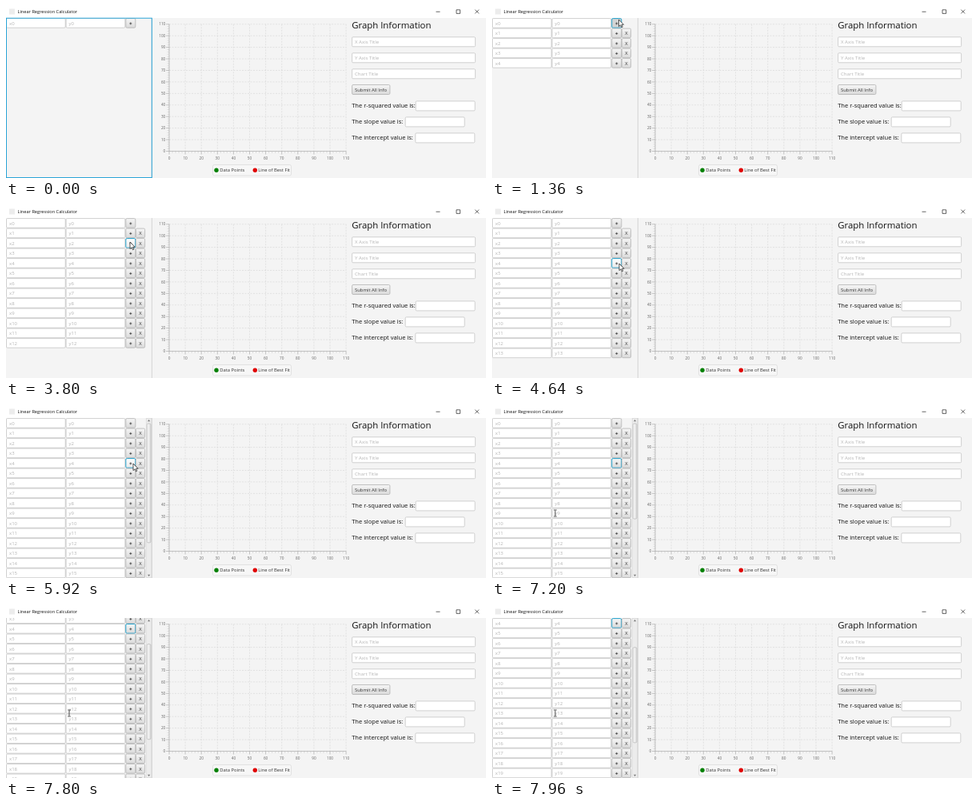
These frames come from a looping animation (600 by 215 pixels, 8000 ms). An HTML page:

```html
<!DOCTYPE html>
<html lang="en">
<head>
<meta charset="utf-8">
<title>Linear Regression Calculator</title>
<style>
html, body { margin: 0; width: 100%; height: 100%; overflow: hidden; background: #f4f4f4; }
svg { display: block; width: 600px; height: 215px; }
text { font-family: "Open Sans", "Noto Sans", sans-serif; fill: #333; white-space: pre; }
.prompt { fill: #b4b4b4; }
.axis { fill: #666; }
</style>
</head>
<body>
<svg id="stage" viewBox="0 0 600 215" xmlns="http://www.w3.org/2000/svg">
  <defs>
    <linearGradient id="btn" x2="0" y2="1"><stop offset="0" stop-color="#f6f6f6"/><stop offset="1" stop-color="#dadada"/></linearGradient>
    <linearGradient id="hover" x2="0" y2="1"><stop offset="0" stop-color="#fff"/><stop offset="1" stop-color="#eaeaea"/></linearGradient>
    <linearGradient id="bar"><stop offset="0" stop-color="#fafafa"/><stop offset="1" stop-color="#dedede"/></linearGradient>
    <clipPath id="view"><rect y="15" width="182" height="200"/></clipPath>
  </defs>
</svg>
<script>
const LOOP = 8000, STEP = 40, TOP = 15, PITCH = 12.5, VIEW = 200;
const TRACK_Y = 22, TRACK_H = 186;
const stage = document.getElementById('stage');

function el(tag, attrs, parent = stage) {
  const node = document.createElementNS('http://www.w3.org/2000/svg', tag);
  for (const k in attrs) node.setAttribute(k, attrs[k]);
  parent.appendChild(node);
  return node;
}
const set = (node, attrs) => { for (const k in attrs) node.setAttribute(k, attrs[k]); };
const show = (node, on) => node.setAttribute('visibility', on ? 'visible' : 'hidden');
const rect = (x, y, width, height, attrs, parent) => el('rect', { x, y, width, height, ...attrs }, parent);
const path = (d, attrs, parent) => el('path', { d, fill: 'none', ...attrs }, parent);
function label(str, x, y, size, attrs, parent) {
  const node = el('text', { x, y, 'font-size': size, ...attrs }, parent);
  node.textContent = str;
  return node;
}
const field = (x, y, w, h, parent) =>
  rect(x, y, w, h, { rx: 1.2, fill: '#fff', stroke: '#c6c6c6', 'stroke-width': 0.8 }, parent);
const button = (x, y, w, h, parent) =>
  rect(x, y, w, h, { rx: 1.4, fill: 'url(#btn)', stroke: '#b3b3b3', 'stroke-width': 0.8 }, parent);

function drawTitleBar() {
  rect(0, 0, 600, 15, { fill: '#fff' });
  rect(4, 3.5, 7, 7, { fill: '#ececec' });
  label('Linear Regression Calculator', 14.5, 9.3, 5.65, { style: 'fill:#111' });
  const line = { stroke: '#222', 'stroke-width': 0.7 };
  path('M537.5 7.2h5', line);
  path('M563 4.8h4.6v4.6h-4.6z', line);
  path('M586.3 4.6l4.8 4.8m0-4.8l-4.8 4.8', line);
}

function drawChart() {
  const x0 = 204, y0 = 181.5, dx = 20.1, dy = 14.43;
  const right = x0 + 11 * dx, top = y0 - 11 * dy;
  let grid = '', major = '', minor = '';
  for (let i = 0; i <= 11; i++) {
    const x = x0 + i * dx, y = y0 - i * dy;
    grid += `M${x} ${top}V${y0}M${x0} ${y}H${right}`;
    major += `M${x} ${y0}v4M${x0} ${y}h-4`;
    label(i * 10, x, 191.6, 4.7, { class: 'axis', 'text-anchor': 'middle' });
    label(i * 10, 199.3, y + 1.7, 4.7, { class: 'axis', 'text-anchor': 'end' });
    if (i < 11) for (let j = 1; j < 5; j++)
      minor += `M${x + j * dx / 5} ${y0}v2.5M${x0} ${y - j * dy / 5}h-2.5`;
  }
  path(grid, { stroke: '#d6d6d6', 'stroke-width': 0.6, 'stroke-dasharray': '2 1.5' });
  path(minor, { stroke: '#c4c4c4', 'stroke-width': 0.5 });
  path(major, { stroke: '#a0a0a0', 'stroke-width': 0.6 });
  path(`M${x0} ${top}V${y0}H${right}`, { stroke: '#b0b0b0', 'stroke-width': 0.7 });

  rect(258.5, 198.5, 98, 13.5, { rx: 2, fill: '#f7f7f7', stroke: '#d8d8d8', 'stroke-width': 0.7 });
  el('circle', { cx: 263, cy: 205.2, r: 2.7, fill: '#008000' });
  label('Data Points', 267.3, 207.3, 5.8);
  el('circle', { cx: 311.3, cy: 205.2, r: 2.7, fill: '#e00000' });
  label('Line of Best Fit', 315.3, 207.3, 5.8);
}

function drawForm() {
  const dark = { style: 'fill:#111' };
  label('Graph Information', 432.2, 27.9, 11.4, dark);
  ['X Axis Title', 'Y Axis Title', 'Chart Title'].forEach((s, i) => {
    field(432.6, 38.8 + i * 20, 154, 12, stage);
    label(s, 436, 46.9 + i * 20, 6.1, { class: 'prompt' });
  });
  button(432.6, 98.5, 47.3, 12);
  label('Submit All Info', 436, 106.7, 5.9);
  [['r-squared', 512], ['slope', 499], ['intercept', 511.6]].forEach(([s, x], i) => {
    label(`The ${s} value is:`, 432.2, 127.2 + i * 20, 7.55, dark);
    field(x + 0.2, 118.9 + i * 20, 74, 12);
  });
}

rect(0, 0, 600, 215, { fill: '#f4f4f4' });
drawTitleBar();
drawChart();
drawForm();
path('M182.4 15V215', { stroke: '#cdcdcd', 'stroke-width': 0.8 });

// data rows: times at which each one is added
const adds = [0, 800, 960, 1120, 1280, 1440, 1600, 1760, 2640, 2800, 3400, 3640, 3800, 4560,
  4800, 5040, 5280, 5440, 5760, 5920, 6080, 6240, 6400, 6560, 6880];
// [time, row] of the focused plus button
const focusAt = [[760, 0], [2480, 5], [3360, 2], [4520, 4]];

const list = el('g', { 'clip-path': 'url(#view)' });
const scroller = el('g', {}, list);
const rows = adds.map((_, i) => {
  const g = el('g', { transform: `translate(0 ${TOP + i * PITCH})` }, scroller);
  ['x', 'y'].forEach((name, c) => {
    field(0.5 + c * 74.6, 0.6, 73.7, 11.6, g);
    label(name + i, 4 + c * 74.6, 8.8, 6, { class: 'prompt' }, g);
  });
  const plus = button(149.8, 0.6, 12, 11.6, g);
  path('M154.3 6.9h3M155.8 5.4v3', { stroke: '#333', 'stroke-width': 0.75 }, g);
  if (i) {
    button(162.4, 0.6, 11.2, 11.6, g);
    label('X', 168, 8.7, 5.9, { 'text-anchor': 'middle' }, g);
  }
  return { g, plus };
});

const bar = el('g', {}, list);
rect(175.2, 15.3, 6.6, 199.4, { fill: '#ececec', stroke: '#d2d2d2', 'stroke-width': 0.5 }, bar);
path('M177 19.3l1.6-2.2 1.6 2.2zM177 210.8l1.6 2.2 1.6-2.2z', { style: 'fill:#777' }, bar);
const thumb = rect(176.2, TRACK_Y, 4.8, 10, { rx: 1.5, fill: 'url(#bar)', stroke: '#b5b5b5', 'stroke-width': 0.7 }, bar);

const paneFocus = rect(0.5, 15.2, 181.8, 199.3, { fill: 'none', stroke: '#2ba5d8', 'stroke-width': 1 });

const arrow = path('M0 0V8.6L2 6.8 3.4 9.8 4.8 9.2 3.4 6.3H6.1Z',
  { style: 'fill:#fff', stroke: '#111', 'stroke-width': 0.7, 'stroke-linejoin': 'round' });
const beam = path('M-1.8-4H-.5L0-3.6.5-4H1.8M0-3.6V3.6M-1.8 4H-.5L0 3.6.5 4H1.8',
  { stroke: '#222', 'stroke-width': 0.8 });

// pointer moves: [start, end, x, y]
const start = [176, 218];
const moves = [[160, 720, 158.5, 17], [1800, 2400, 153, 78], [2940, 3320, 155, 45],
  [3840, 4400, 159, 72], [7000, 7200, 79, 134]];

const clamp = v => Math.max(0, Math.min(1, v));
const smooth = v => v * v * (3 - 2 * v);

function pointer(t) {
  let [x, y] = start;
  for (const [a, b, tx, ty] of moves) {
    const k = smooth(clamp((t - a) / (b - a)));
    x += (tx - x) * k;
    y += (ty - y) * k;
  }
  return [x, y];
}

function draw(time) {
  const t = Math.floor(time / STEP) * STEP;
  const count = adds.filter(a => a <= t).length;
  const scroll = 50 * (1 - Math.pow(1 - clamp((t - 7480) / 480), 1.8));
  const [x, y] = pointer(t);
  const focused = focusAt.reduce((r, [at, row]) => t >= at ? row : r, -1);
  const pressed = adds.some(a => a && t >= a - 80 && t < a);
  const hot = x >= 149 && x < 162.5 ? Math.floor((y - TOP + scroll) / PITCH) : -1;

  set(scroller, { transform: `translate(0 ${-scroll})` });
  rows.forEach(({ g, plus }, i) => {
    g.setAttribute('display', i < count ? 'inline' : 'none');
    const on = i === focused;
    set(plus, {
      fill: on && pressed ? '#d4d4d4' : i === hot ? 'url(#hover)' : 'url(#btn)',
      stroke: on ? '#1f9fcb' : '#b3b3b3',
      'stroke-width': on ? 1 : 0.8
    });
  });

  const total = count * PITCH;
  show(bar, total > VIEW);
  set(thumb, { y: TRACK_Y + TRACK_H * scroll / total, height: TRACK_H * Math.min(1, VIEW / total) });
  show(paneFocus, focused < 0);

  const text = x < 149;
  show(arrow, t >= 200 && !text);
  show(beam, text);
  set(text ? beam : arrow, { transform: `translate(${x} ${y})` });
}

function tick() {
  draw(performance.now() % LOOP);
  requestAnimationFrame(tick);
}
tick();
</script>
</body>
</html>
```
